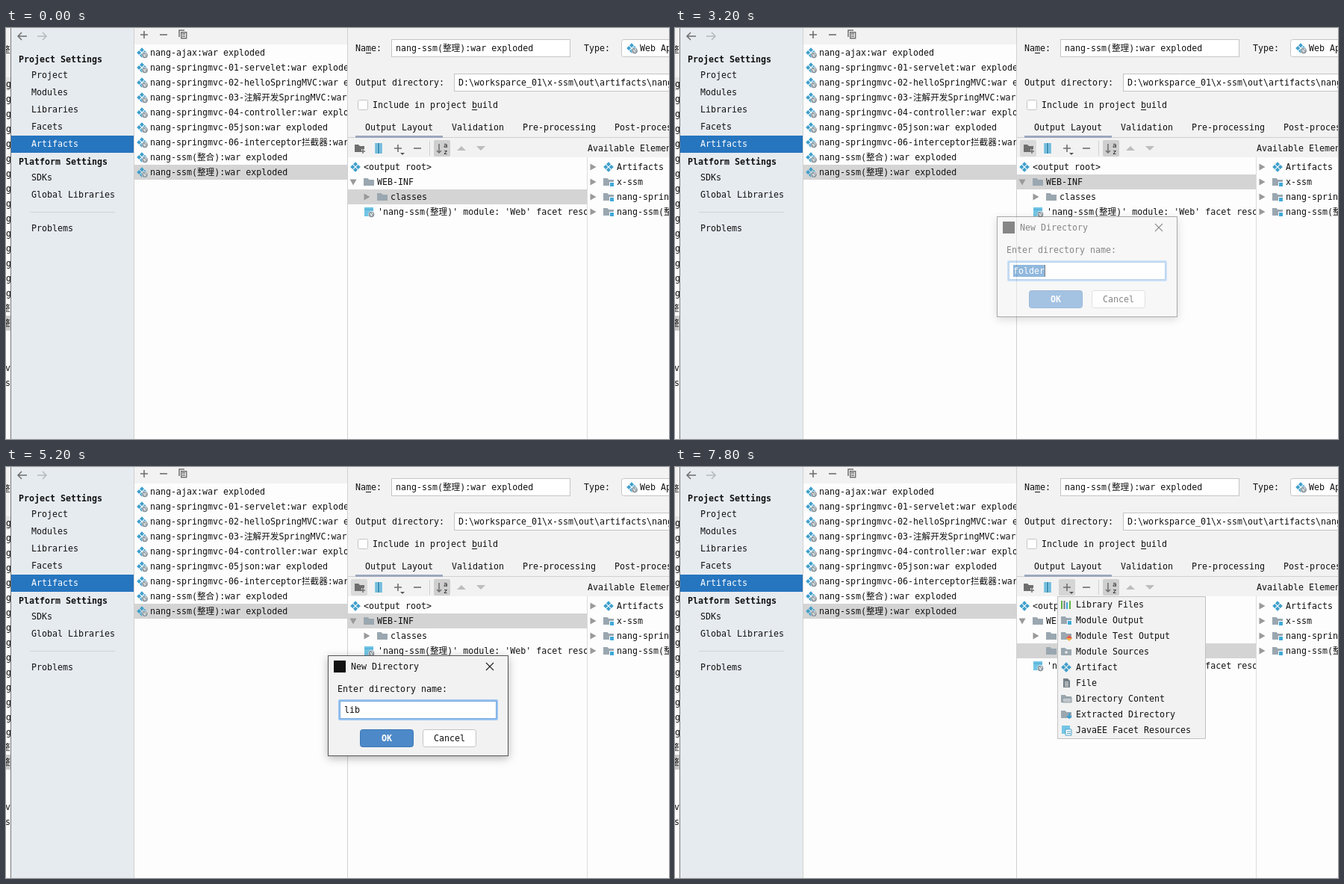
Animation, 888 px wide and 550 px high, one loop 8 s. Source, as an HTML page:

```html
<!DOCTYPE html>
<html lang="en">
<head>
<meta charset="utf-8">
<title>Artifact settings</title>
<style>
  html, body { margin: 0; width: 100%; height: 100%; overflow: hidden; background: #f2f2f2; }
  svg { display: block; width: 888px; height: 550px; }
  text { font: 11.63px "DejaVu Sans Mono", "Noto Sans CJK SC", "Noto Sans CJK", monospace; fill: #111; white-space: pre; }
  .bold { font-weight: bold; }
  .white { fill: #fff; }
  .line { fill: none; stroke: #6e6e6e; stroke-width: 1.6; }
  .field { fill: #fff; stroke: #c4c4c4; }
  .ime { font-size: 15px; font-family: "Noto Sans CJK SC", "Noto Sans CJK", sans-serif; }
  #dialog { filter: drop-shadow(0 3px 6px rgba(0, 0, 0, .28)); }
</style>
</head>
<body>
<svg id="stage" viewBox="0 0 888 550">
  <defs>
    <path id="diamonds" d="M0-6.8l3 3-3 3-3-3zM3.8-3l3 3-3 3-3-3zM0 .8l3 3-3 3-3-3zM-3.8-3l3 3-3 3-3-3z" fill="#3f9fcb"/>
    <g id="globe">
      <circle r="4.4" fill="#fff"/>
      <circle r="3.4" fill="#a5afb5" stroke="#78848b"/>
      <path d="M-2-1l2 1 0 2M1-3l1 2" fill="none" stroke="#fff"/>
    </g>
    <g id="webArtifact"><use href="#diamonds"/><use href="#globe" x="4" y="3.5"/></g>
    <path id="folder" d="M-7-5h5.5l2 2H7v8H-7z" fill="#9aa7b0"/>
    <g id="module"><use href="#folder"/><path d="M1 0h7v7H1z" fill="#fff"/><path d="M2 1h5v5H2z" fill="#3fa9d8"/></g>
    <g id="facet"><path d="M-6-6H6V6H-6z" fill="#72c5e6"/><path d="M-6-3H6" stroke="#49a8cf"/><use href="#globe" x="3.5" y="3.5"/></g>
    <path id="plus" class="line" d="M-5 0H5M0-5V5"/>
    <path id="minus" class="line" d="M-5 0H5"/>
    <path id="right" d="M-3.5-4.5L4.5 0-3.5 4.5z"/>
    <path id="down" d="M-4.5-3.5H4.5L0 4.5z"/>
    <g id="library" fill="none" stroke-width="2">
      <path d="M-6-5V6" stroke="#62b543"/><path d="M-2.5-5V6" stroke="#6e7b83"/>
      <path d="M1-3V6" stroke="#40a8d8"/><path d="M5-5V6" stroke="#62b543"/>
    </g>
    <g id="test"><use href="#folder"/><path d="M4-1l4 4-4 4-4-4z" fill="#f4af3d"/><path d="M4-1l4 4H0z" fill="#e05555"/></g>
    <g id="sources"><use href="#folder"/><path d="M-2 1h4M0-1v4" stroke="#fff"/></g>
    <g id="file"><path d="M-4-6h6l3 3v9h-9z" fill="#737f86"/><path d="M-2-1h5M-2 1.5h5M-2 4h5" stroke="#fff"/></g>
    <g id="content"><use href="#folder"/><path d="M-5-1H7v6H-5z" fill="#c0c8ce" stroke="#7c8990" stroke-width=".8"/></g>
    <g id="extracted"><use href="#folder"/><path d="M4-2v7M1 2l3 3 3-3" fill="none" stroke="#2f9fd5" stroke-width="1.6"/></g>
    <g id="resources"><path d="M-6-6H5V5H-6z" fill="#72c5e6"/><path d="M-1-1h8v8h-8z" fill="#fff" stroke="#4b9fc3"/><path d="M1 2h5M1 4.5h5" stroke="#4b9fc3"/></g>
  </defs>
</svg>
<script>
const LOOP = 8000, BLUE = '#2675bf', GRAY = '#d4d4d4', PANEL = '#f2f2f2', PAPER = '#fdfdfd';

// y is the vertical centre of a row
const text = (x, y, s, cls = '') =>
  `<text x="${x}" y="${y + 4}" class="${cls}">${s.replace(/</g, '&lt;').replace(/>/g, '&gt;')}</text>`;
const rect = (x, y, w, h, fill, more = '') =>
  `<rect x="${x}" y="${y}" width="${w}" height="${h}" fill="${fill}" ${more}/>`;
const box = (x, y, w, h, r = 0) =>
  `<rect class="field" x="${x + .5}" y="${y + .5}" width="${w - 1}" height="${h - 1}" rx="${r}"/>`;
const path = (d, stroke, width = 1, fill = 'none') =>
  `<path d="${d}" stroke="${stroke}" stroke-width="${width}" fill="${fill}"/>`;
const icon = (id, x, y, fill = '#9a9a9a') => `<use href="#${id}" x="${x}" y="${y}" fill="${fill}"/>`;
// shows its content during the listed "from-to" spans in ms
const during = (spans, ...parts) => `<g data-on="${spans}">${parts.join('')}</g>`;

function backdrop() {
  const rows = Array.from({ length: 15 }, (_, i) => text(-7, 75 + 20 * i, 'ng'));
  return rect(0, 0, 7, 550, PAPER) + rect(0, 0, 6, 66, PANEL) + rect(0, 66, 6, 18, '#e4e4e4') +
    rect(0, 385, 6, 20, '#c9c9c9') + rows.join('') +
    text(-6, 29, '整') + text(-6, 375, '整') + text(-6, 395, '整') +
    text(-1, 455, 'v') + text(-1, 475, 's') + path('M6.5 0V550', '#777');
}

function sidebar() {
  const items = { Project: 63, Modules: 86, Libraries: 109, Facets: 132, SDKs: 200, 'Global Libraries': 223, Problems: 268 };
  return rect(7, 0, 164, 550, '#e6ebf0') +
    path('M28 11H16M21 6l-5 5 5 5', '#6e6e6e', 1.5) + path('M42 11H54M49 6l5 5-5 5', '#b4babf', 1.5) +
    text(17, 42, 'Project Settings', 'bold') + text(17, 179, 'Platform Settings', 'bold') +
    rect(7, 144, 164, 23, BLUE) + text(34, 155, 'Artifacts', 'white') +
    Object.entries(items).map(([name, y]) => text(34, y, name)).join('') +
    path('M32 246.5H146', '#cfd4d9');
}

function artifactList() {
  const names = ['ajax', 'springmvc-01-servelet', 'springmvc-02-helloSpringMVC', 'springmvc-03-注解开发SpringMVC',
    'springmvc-04-controller', 'springmvc-05json', 'springmvc-06-interceptor拦截器', 'ssm(整合)', 'ssm(整理)'];
  return rect(171, 0, 287, 550, PAPER) + rect(171, 0, 287, 22, PANEL) + path('M171.5 0V550', '#d1d1d1') +
    icon('plus', 185, 9) + icon('minus', 211, 9) +
    path('M239 3H232V12', '#6e6e6e', 1.5) + path('M234.7 5.7h7v8h-7zM236 8h4M236 11h4', '#6e6e6e', 1.4) +
    rect(172, 183, 285, 20, GRAY) +
    names.map((n, i) => icon('webArtifact', 182, 33 + 20 * i) + text(193, 33 + 20 * i, `nang-${n}:war exploded`)).join('');
}

function form() {
  const tabs = [[481, 'Output Layout'], [597, 'Validation'], [692, 'Pre-processing'], [815, 'Post-processing']];
  return rect(457, 0, 431, 550, PANEL) +
    text(468, 27, 'Name:') + path('M482 33.5h7', '#111') +
    box(516, 15, 240, 24) + text(522, 27, 'nang-ssm(整理):war exploded') +
    text(774, 27, 'Type:') + box(824, 15, 90, 24, 3) + icon('webArtifact', 838, 27) + text(849, 27, 'Web Application') +
    text(468, 73, 'Output directory:') + box(600, 61, 300, 24) +
    text(606, 73, 'D:\\worksparce_01\\x-ssm\\out\\artifacts\\nang_ssm') +
    box(471, 96, 14, 14, 2) + text(491, 103, 'Include in project build') + path('M624 109.5h7', '#111') +
    tabs.map(([x, s]) => text(x, 133, s)).join('') + path('M458 146.5H888', '#d1d1d1') +
    rect(468, 144, 117, 3, '#9ca7bd') + during('2300-3200 5900-7800', rect(468, 144, 117, 3, '#3d83c5'));
}

function toolbar() {
  return during('2900-5900', rect(462, 150, 22, 22, '#dadada', 'rx="2"')) +
    during('6500-6700 7500-8000', rect(514, 150, 22, 22, '#d5d5d5', 'rx="2"')) +
    rect(573, 150, 22, 22, '#cfcfcf', 'rx="2"') +
    '<path d="M467 156h5l2 2h6v4h-4v4h-9z" fill="#6e6e6e"/>' + path('M478 162v6M475 165h6', '#6e6e6e', 1.5) +
    rect(494, 154, 10, 14, '#8acbe7') + path('M499 154v14', '#3d8fb3', 2) + path('M496 154v14M502 154v14', '#58a8ca') +
    icon('plus', 525, 161) + '<path d="M528 167h6l-3 3z" fill="#555"/>' + icon('minus', 551, 161) +
    path('M567.5 151V171', '#d1d1d1') +
    path('M580 155v12M577 164l3 3 3-3', '#6e6e6e', 1.5) +
    '<text x="586" y="160" style="font-size:9px">a</text><text x="586" y="169" style="font-size:9px">z</text>' +
    '<path d="M604 164h12l-6-6zM630 158h12l-6 6z" fill="#bdbdbd"/>' +
    text(779, 161, 'Available Elements');
}

function tree() {
  const row = (y, fill) => rect(458, y - 10, 320, 20, fill);
  const facet = y => icon('facet', 486, y) + text(498, y, "'nang-ssm(整理)' module: 'Web' facet resources");
  const lib = cls => icon('folder', 504, 246) + text(515, 246, 'lib', cls);
  return rect(458, 173, 320, 377, PAPER) +
    icon('diamonds', 468, 186) + text(479, 186, '<output root>') +
    during('0-2300', row(226, GRAY)) + during('3200-5900', row(206, GRAY)) +
    icon('down', 465, 206) + icon('folder', 486, 206) + text(497, 206, 'WEB-INF') +
    during('2300-3200 5900-6000', row(206, BLUE), icon('down', 465, 206, '#fff'),
      icon('folder', 486, 206), text(497, 206, 'WEB-INF', 'white')) +
    icon('right', 483, 226) + icon('folder', 504, 226) + text(515, 226, 'classes') +
    during('0-5900', facet(246)) + during('5900-8000', facet(266)) +
    during('5900-6000', lib()) + during('6000-7800', row(246, BLUE), lib('white')) +
    during('7800-8000', row(246, GRAY), lib());
}

function available() {
  const names = ['Artifacts', 'x-ssm', 'nang-springmvc', 'nang-ssm(整理)'];
  return rect(778, 173, 110, 377, PAPER) + path('M778.5 173V550', '#dcdcdc') +
    names.map((n, i) => {
      const y = 186 + 20 * i;
      return icon('right', 786, y) + icon(i ? 'module' : 'diamonds', 807, y) + text(818, y, n);
    }).join('') + path('M457.5 0V550', '#d1d1d1');
}

function dialog() {
  const caret = x => rect(x, 317, 1, 16, '#000');
  const composing = s => text(453, 325, s) +
    `<path d="M453 332.5h${7 * s.length}" stroke="#333" stroke-dasharray="1 1"/>` + caret(453 + 7 * s.length);
  const candidates = (words, step) => rect(467.5, 337.5, 440, 42, '#fff', 'stroke="#cfcfcf"') +
    words.map((w, i) => `<text class="ime" x="${482 + step * i}" y="364" style="fill:${i ? '#222' : BLUE}">${i + 1} ${w}</text>`).join('');
  return '<g id="dialog">' + rect(431.5, 252.5, 241, 134, PANEL, 'stroke="#555"') + '</g>' +
    rect(439, 259, 16, 16, '#111') + text(462, 267, 'New Directory') +
    path('M643 262l10 10M653 262l-10 10', '#222', 1.1) + text(444, 297, 'Enter directory name:') +
    rect(446, 312, 212, 26, '#fff', 'rx="1" stroke="#97c3f3" stroke-width="2"') +
    rect(447.5, 313.5, 209, 23, '#fff', 'stroke="#7aa9d8"') +
    rect(474.5, 351.5, 71, 23, '#4d89c8', 'rx="3" stroke="#3c78b5"') + text(503, 363, 'OK', 'bold white') +
    box(558, 351, 72, 24, 3) + text(573, 363, 'Cancel') +
    during('3200-4200', rect(453, 317, 42, 16, BLUE), text(453, 325, 'folder', 'white')) +
    during('3200-3700', caret(495)) +
    during('4200-4300', composing('l')) +
    during('4300-4500', composing('li'), candidates(['里', '力', '利', '立', '离', '理', '例'], 58)) +
    during('4500-4700', composing('lib'), candidates(['离别', '篱笆', '礼拜', '例表', '礼包', '里边'], 76)) +
    during('4700-5900', text(453, 325, 'lib')) + during('4700-5200 5600-5900', caret(474));
}

function addMenu() {
  const items = [['library', 'Library Files'], ['module', 'Module Output'], ['test', 'Module Test Output'],
    ['sources', 'Module Sources'], ['diamonds', 'Artifact'], ['file', 'File'], ['content', 'Directory Content'],
    ['extracted', 'Extracted Directory'], ['resources', 'JavaEE Facet Resources']];
  return rect(512.5, 173.5, 198, 190, PANEL, 'stroke="#c3c3c3"') +
    items.map(([id, label], i) => icon(id, 524, 184 + 21 * i) + text(537, 184 + 21 * i, label)).join('');
}

const stage = document.getElementById('stage');
stage.insertAdjacentHTML('beforeend', backdrop() + sidebar() + artifactList() + form() + toolbar() + tree() + available() +
  `<g id="window" data-on="3200-5900">${dialog()}</g>` + during('7800-8000', addMenu()));

const timed = [...stage.querySelectorAll('[data-on]')].map(el => ({
  el, spans: el.dataset.on.split(' ').map(s => s.split('-').map(Number))
}));
const dialogWindow = document.getElementById('window');
const start = performance.now();

function draw() {
  const t = Math.max(0, performance.now() - start) % LOOP;
  for (const { el, spans } of timed)
    el.style.display = spans.some(([from, to]) => t >= from && t < to) ? '' : 'none';
  // the window fades briefly as it opens and closes
  dialogWindow.style.opacity = t < 3300 || t >= 5800 ? .5 : 1;
  requestAnimationFrame(draw);
}
draw();
</script>
</body>
</html>
```
